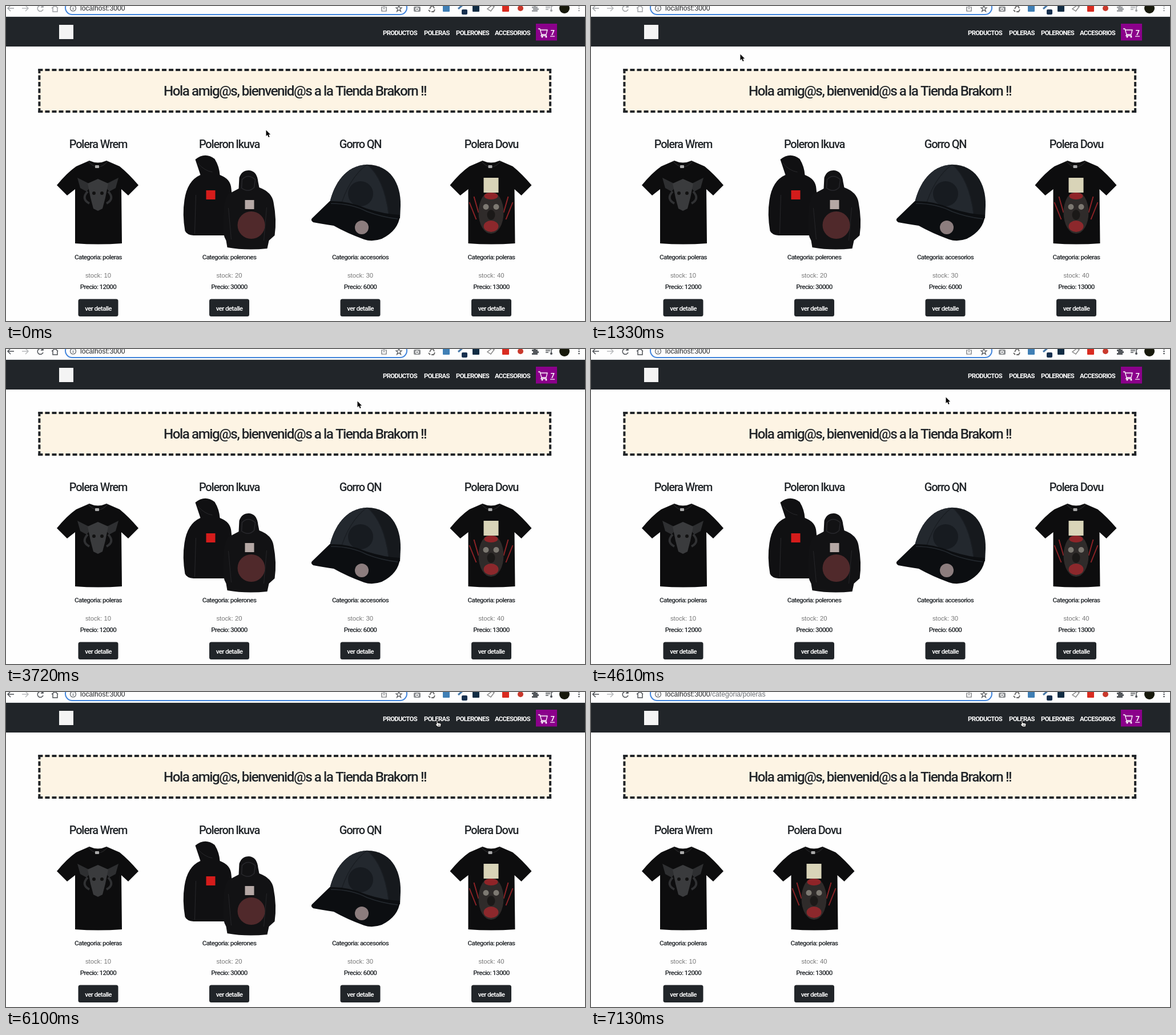
An HTML page with a canvas for the animation above (8 s loop, 1014 by 552 pixels).

```html
<!DOCTYPE html>
<html lang="es">
<head>
<meta charset="utf-8">
<title>Tienda</title>
<style>
html, body { margin: 0; width: 100%; height: 100%; overflow: hidden; background: #fff; }
canvas { display: block; width: 1014px; height: 552px; }
</style>
</head>
<body>
<canvas id="stage" width="1014" height="552"></canvas>
<script>
const ctx = document.getElementById('stage').getContext('2d');
const LOOP = 8000, FOCUS = 3120, LOADING = 6690, LISTED = 7130;
const INK = '#212529', COLS = [161.5, 391, 620.5, 850];
const SANS = '"Liberation Sans", Arial, sans-serif';
const GREETING = 'Hola amig@s, bienvenid@s a la Tienda Brakorn !!';

const PRODUCTS = [
  { name: 'Polera Wrem', kind: 'poleras', stock: 10, price: 12000, draw: hornShirt },
  { name: 'Poleron Ikuva', kind: 'polerones', stock: 20, price: 30000, draw: hoodies },
  { name: 'Gorro QN', kind: 'accesorios', stock: 30, price: 6000, draw: cap },
  { name: 'Polera Dovu', kind: 'poleras', stock: 40, price: 13000, draw: redShirt }
];

// Pointer runs: start time, step length, then x,y per step
const RUNS = [
  [0, 150, [455,217]],
  [150, 147, [448,212, 425,190, 390,160, 350,130, 315,108, 290,95, 277,89, 271,87]],
  [1330, 148, [261,84, 245,84, 228,84, 214,84, 207,84, 205,84]],
  [3420, 148, [300,97, 480,100, 615,91, 655,72, 668,56, 670,51]],
  [4610, 148.5, [621,84, 582,150, 559,212, 556,231, 575,228, 620,190, 682,122, 717,79]],
  [5800, 150, [735,64, 747,53, 752,49]]
];

// Tight Roboto stands for the condensed face; one size factor fits it to the banner
const FACE = 'Roboto, "Liberation Sans", sans-serif';
const TIGHT = -0.06;
let grade = 1;

function setFont(size, weight, family, spacing = 0) {
  ctx.font = `${weight} ${size}px ${family}`;
  ctx.letterSpacing = `${spacing * size}px`;
}
function gradeFace() {
  setFont(29, 500, FACE, TIGHT);
  grade = Math.min(1, 460 / ctx.measureText(GREETING).width);
}

function label(s, x, y, size, color = INK, weight = 500, align = 'center') {
  setFont(size * grade, weight, FACE, TIGHT);
  ctx.textAlign = align;
  ctx.fillStyle = color;
  ctx.fillText(s, x, y);
}
function plain(s, x, y, size, color, align = 'left') {
  setFont(size, 400, SANS);
  ctx.textAlign = align;
  ctx.fillStyle = color;
  ctx.fillText(s, x, y);
  return ctx.measureText(s).width;
}
function rect(x, y, w, h, color, r = 0) {
  ctx.fillStyle = color;
  ctx.beginPath();
  ctx.roundRect(x, y, w, h, r);
  ctx.fill();
}
function oval(x, y, rx, color, ry = rx) {
  ctx.fillStyle = color;
  ctx.beginPath();
  ctx.ellipse(x, y, rx, ry, 0, 0, 7);
  ctx.fill();
}
function fill(d, color) {
  ctx.fillStyle = color;
  ctx.fill(new Path2D(d));
}
function line(d, color, w = 1.5) {
  ctx.strokeStyle = color;
  ctx.lineWidth = w;
  ctx.stroke(new Path2D(d));
}
function at(x, y, draw) {
  ctx.save();
  ctx.translate(x, y);
  draw();
  ctx.restore();
}

function toolbar(t) {
  const on = t >= FOCUS;
  const c = on ? '#4d5156' : '#a0a3a6';
  line('M14 4H3M8 -1L3 4L8 9', c);
  line('M28 4H39M34 -1L39 4L34 9', '#b9bbbd');
  line('M64 1A5 5 0 1 0 65 6M65 -2V2H61', c);
  line('M80 4L86 -1L91 4M82 3V10H90V3', c);

  ctx.strokeStyle = '#4285dc';
  ctx.lineWidth = 2;
  ctx.beginPath();
  ctx.roundRect(104, -9, 598, 24, 12);
  ctx.stroke();
  line('M122.500 4A5 5 0 1 1 112.500 4A5 5 0 1 1 122.500 4M117.500 3V7M117.500 1V2', '#5f6368', 1.2);
  const w = plain('localhost:3000', 130, 8, 12.2, '#26282b');
  if (t >= LOADING) plain('/categoria/poleras', 130 + w, 8, 12.2, '#6a6e73');
  line('M660 2H658V9H666V2H664M662 6V-2M660 0L662 -2L664 0', '#66696d', 1.2);
  line('M688 -1L689.500 3H693L690 5.500L691.500 9.500L688 7L684.500 9.500L686 5.500L683 3H686.500Z', '#55585c', 1.2);

  rect(714, 1, 12, 9, '#8a8d90', 2);
  oval(720, 5.5, 3, '#fff');
  oval(720, 5.5, 1.6, '#8a8d90');
  line('M742 5L745 0H748L750 4M751 6L749 10H745M743 10L740 7', '#666', 1.8);
  rect(765, -2, 12, 12, '#3f7fb5', 1);
  line('M792 5L800 -2', '#4678a8', 3);
  rect(798, 6, 10, 9, '#17304f', 2);
  rect(817, -2, 12, 12, '#102c43', 1);
  line('M843 5L851 -1L855 1L849 9Z', '#888', 1.5);
  rect(869, -2, 12, 12, '#d92b20', 1);
  oval(901, 4, 5, '#c9392c');
  fill('M921 1H924V-2H928V1H931V4H933V7H931V10H921V7H923V4H921Z', on ? '#55595d' : '#a4a7aa');
  line('M945 0H953M945 3H953M945 6H950M955 8V0H958', c, 1.5);
  oval(955, 8, 2, c);
  oval(978, 4, 9, '#17190b');
  for (const y of [0, 4, 8]) oval(1003.5, y, 1.3, c);
  rect(0, 18, 1014, 1, '#dfe1e4');
}

function navbar() {
  rect(0, 19, 1014, 52, INK);
  rect(93, 33, 25, 25, '#f4f4f4');
  const items = { PRODUCTOS: 660, POLERAS: 732, POLERONES: 788, ACCESORIOS: 856 };
  for (const s in items) label(s, items[s], 50.5, 13.6, '#fff', 600, 'left');
  rect(928, 31, 37, 29.5, '#8b008b');
  line('M932 40H935L938 50H946L948 42H936M938 50L937 52H947', '#fff', 1.3);
  oval(939, 54, 1.5, '#fff');
  oval(946, 54, 1.5, '#fff');
  label('7', 957, 51, 15, '#fff', 600);
  rect(953, 52.5, 8, 1.2, '#fff');
}

function dashes(x1, y1, x2, y2) {
  const len = Math.hypot(x2 - x1, y2 - y1);
  const n = Math.round((len - 8) / 12);
  ctx.setLineDash([8, (len - 8 * (n + 1)) / n]);
  line(`M${x1} ${y1}L${x2} ${y2}`, INK, 4);
  ctx.setLineDash([]);
}
function banner() {
  const l = 56.4, r = 955.1, top = 110, bottom = 187;
  rect(l, top, r - l, bottom - top, '#fdf4e4');
  dashes(l, top + 2, r, top + 2);
  dashes(l, bottom - 2, r, bottom - 2);
  dashes(l + 2, top, l + 2, bottom);
  dashes(r - 2, top, r - 2, bottom);
  label(GREETING, 506, 157, 29);
}

// Garments are drawn around the column centre
function shirt() {
  fill('M-15 271Q0 278 15 271L38 281Q54 294 71 314L53 332L41 321L42 416Q0 419 -40 416L-40 321L-54 332L-72 314Q-54 292 -38 281Z', '#0d0d0e');
  line('M-17 272Q0 292 17 272', '#242426', 1.2);
  rect(-5, 279, 7, 5, '#aaa', 1);
}
function hornShirt() {
  shirt();
  fill('M-36 301L-10 314L-20 325L-31 319ZM36 301L10 314L20 325L31 319Z', '#2e2f31');
  fill('M-18 311L0 303L18 311L13 336L8 355L0 359L-8 355L-13 336Z', '#3a3b3d');
  line('M-18 325Q-30 338 -15 346M18 325Q30 338 15 346', '#303133', 4);
  oval(-7, 328, 3, '#111');
  oval(7, 328, 3, '#111');
}
function redShirt() {
  shirt();
  line('M-38 344L-26 374M38 344L26 374M-30 334L-22 362M30 334L22 362', '#8c2226', 2);
  oval(0, 362, 22, '#2f2b2a', 37);
  rect(-13, 301, 26, 26, '#d9d4b8');
  oval(0, 333, 12, '#8f2428', 6);
  oval(-9, 352, 5, '#7d7972');
  oval(9, 352, 5, '#7d7972');
  oval(0, 366, 7, '#1b1918', 9);
  oval(0, 386, 13, '#8c282c', 10);
}
function hoodies() {
  fill('M-59 269Q-42 255 -25 268Q-17 281 -16 296Q3 303 4 320L7 350V393L0 402H-62Q-74 401 -77 394Q-82 365 -78 340Q-73 306 -50 296Z', '#101012');
  line('M-55 275Q-43 289 -29 291M-58 331L-60 399', '#28282b', 1);
  rect(-40, 323, 16, 16, '#d51c1b');
  fill('M18 301Q22 288 35 288Q49 289 51 308L53 318Q75 326 78 344Q84 375 80 402L70 411L67 425Q30 429 -3 423L-5 411Q-12 400 -10 378Q-10 341 -2 330L17 320Z', '#121214');
  line('M23 304Q33 293 46 304L44 318Q34 328 22 319Z', '#28282c', 1.5);
  line('M-1 354L4 409M66 353L61 411', '#262629', 1);
  oval(39, 384, 24, '#50292b');
  rect(28, 340, 16, 16, '#b5a8a5');
}
function cap() {
  fill('M-53 344C-45 312 -26 279 13 278C52 278 72 310 71 350L70 372L-20 365Z', '#16191d');
  fill('M-53 344C-45 312 -26 279 13 278Q42 303 50 366L-20 365Z', '#23282e');
  line('M12 278Q-20 302 -35 354M13 278Q42 303 50 362', '#1a1e23', 1.5);
  oval(1, 329, 22, '#171b20');
  fill('M-53 342Q-20 341 12 355Q43 365 70 366Q68 393 38 408Q21 414 7 409Q-23 398 -46 385Q-66 382 -82 379Q-88 375 -83 371Z', '#0c0e11');
  line('M-51 346Q-15 346 12 360Q38 370 66 373', '#24292f', 1.5);
  oval(3, 388, 12, '#8c7d7e');
}

function card(p, x) {
  label(p.name, x, 249, 24);
  at(x - 0.5, 0, p.draw);
  label('Categoria: ' + p.kind, x, 444, 14);
  plain('stock: ' + p.stock, x, 476, 11.3, '#777', 'center');
  label('Precio: ' + p.price, x, 496, 14);
  rect(x - 35, 513.5, 70, 30.5, INK, 3.5);
  label('ver detalle', x, 534, 14, '#fff');
}

function spinner(t) {
  label('loading', 506, 241, 14);
  const a = Math.PI / 2 + (t - LOADING) / 750 * Math.PI * 2;
  ctx.strokeStyle = INK;
  ctx.lineWidth = 3.4;
  ctx.beginPath();
  ctx.arc(506, 271, 11.4, a, a + Math.PI * 1.5);
  ctx.stroke();
}

function pointer(t) {
  const [start, step, pts] = RUNS.filter(r => t >= r[0]).pop();
  const i = Math.min(pts.length / 2 - 1, Math.floor((t - start) / step));
  const x = pts[2 * i], y = pts[2 * i + 1];
  at(x, y, () => {
    ctx.lineJoin = 'round';
    if (y < 58) {
      const d = 'M2 1Q3 -0.500 4 1V5L9 6Q10.500 6.500 10 8L9 12H4L0 8Q0 6.500 2 7.500Z';
      fill(d, '#fff');
      line(d, '#111', 1);
      line('M5 8V10.500M7 8V10.500', '#111', 0.8);
    } else {
      const d = 'M0.500 0.500V11L3 8.800L4.800 13L6.600 12.200L4.900 8.200H8.200Z';
      line(d, '#fff', 1.6);
      fill(d, '#000');
    }
  });
}

function render(t) {
  rect(0, 0, 1014, 552, '#fefefe');
  toolbar(t);
  navbar();
  banner();
  if (t >= LOADING && t < LISTED) {
    spinner(LOADING + Math.floor((t - LOADING) / 147) * 147);
  } else {
    const list = t < LOADING ? PRODUCTS : PRODUCTS.filter(p => p.kind === 'poleras');
    list.forEach((p, i) => card(p, COLS[i]));
  }
  pointer(t);
}

gradeFace();
const begin = performance.now();
function tick() {
  render((performance.now() - begin) % LOOP);
  requestAnimationFrame(tick);
}
tick();
</script>
</body>
</html>
```
